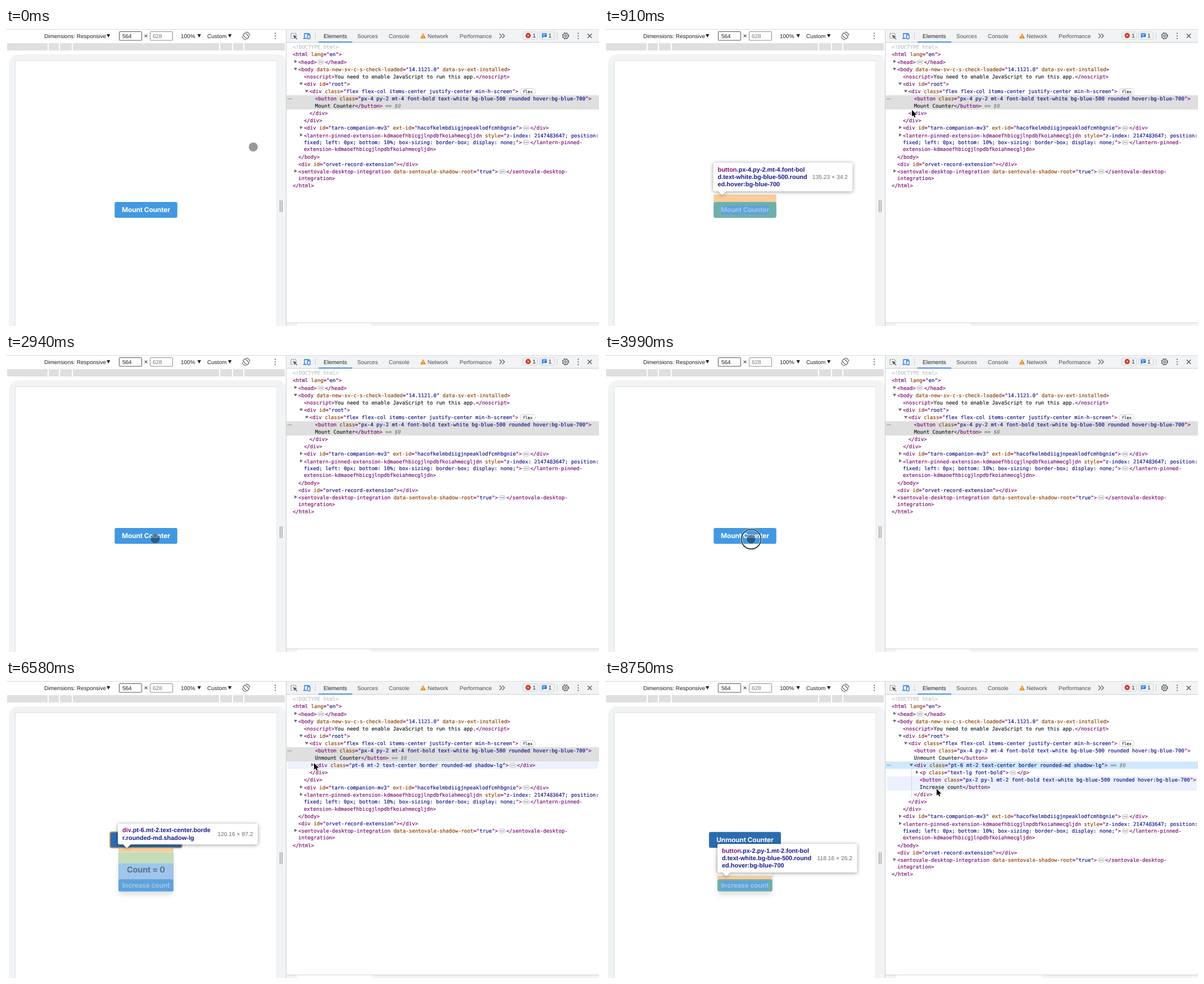
An HTML page with a canvas that plays this animation: 1055x531 px, repeating every 9590 ms.

```html
<!DOCTYPE html>
<html lang="en">
<head>
<meta charset="utf-8">
<title>Mount counter</title>
<style>
html, body { margin: 0; width: 100%; height: 100%; overflow: hidden; background: #fff; }
canvas { display: block; }
</style>
</head>
<body>
<canvas id="stage" width="1055" height="531"></canvas>
<script>
const ctx = document.getElementById('stage').getContext('2d');
const LOOP = 9590, STEP = 70;
const MOUNT = 4200, TREE_MOUNT = 4760, FLASH_END = 6090, EXPAND = 7000;
const SANS = '"Liberation Sans", Arial, sans-serif';
const PAGE = 'Inter, sans-serif';
const MONO = '"DejaVu Sans Mono", monospace';
const CODE = 9.08;
const PURPLE = '#7d1074', BROWN = '#8f4206', NAVY = '#18188c', INK = '#202124', ICON = '#55595e', BLUE = '#1a73e8';
const TINT = {
  content: 'rgba(111,168,220,.66)', padding: 'rgba(147,196,125,.55)', margin: 'rgba(246,178,107,.66)'
};

// Cursor path: time, x, y
const PATH = [
  [0, 440, 212], [70, 464, 199], [210, 512, 172], [560, 525, 165], [770, 533, 158],
  [910, 546, 146], [1190, 568, 138], [1540, 590, 131], [1680, 589, 131], [1890, 581, 130],
  [2030, 581, 130], [2100, 540, 152], [2170, 482, 192], [2240, 430, 222], [2590, 268, 328],
  [2870, 266, 329], [3640, 260, 330], [4200, 260, 330], [4550, 330, 285], [4970, 505, 163],
  [5110, 528, 155], [5700, 588, 152], [6090, 595, 151], [6580, 548, 148], [6860, 546, 150],
  [7490, 546, 150], [7700, 558, 164], [7840, 572, 178], [8260, 589, 192], [8610, 589, 192], [8750, 590, 194]
];
const HOVER = [[0, ''], [210, 'rootEnd'], [770, 'flexEnd'], [910, 'button'], [2100, 'flexEnd'], [2240, ''],
  [5040, 'card'], [7700, 'p'], [7840, 'increase']];
const OVERLAY = [[0, ''], [210, 'page'], [910, 'button'], [2240, ''], [5040, 'card'], [7700, 'p'], [7840, 'increase']];

const latest = (track, t) => track.filter(k => k[0] <= t).pop()[1];

function cursorAt(t) {
  const i = PATH.findIndex(k => k[0] > t);
  if (i < 0) return PATH[PATH.length - 1].slice(1);
  const [t0, x0, y0] = PATH[i - 1], [t1, x1, y1] = PATH[i];
  const p = (t - t0) / (t1 - t0);
  return [x0 + (x1 - x0) * p, y0 + (y1 - y0) * p];
}

// Drawing helpers
function rect(x, y, w, h, fill) {
  ctx.fillStyle = fill;
  ctx.fillRect(x, y, w, h);
}
function paint(fill, stroke, lw = 1) {
  if (fill) { ctx.fillStyle = fill; ctx.fill(); }
  if (stroke) { ctx.strokeStyle = stroke; ctx.lineWidth = lw; ctx.stroke(); }
}
function round(x, y, w, h, r, fill, stroke, lw) {
  ctx.beginPath();
  ctx.roundRect(x, y, w, h, r);
  paint(fill, stroke, lw);
}
function circle(x, y, r, fill, stroke, lw) {
  ctx.beginPath();
  ctx.arc(x, y, r, 0, 7);
  paint(fill, stroke, lw);
}
function poly(pts, fill, stroke, lw, close = !!fill) {
  ctx.beginPath();
  for (let i = 0; i < pts.length; i += 2) ctx.lineTo(pts[i], pts[i + 1]);
  if (close) ctx.closePath();
  paint(fill, stroke, lw);
}
function frame(outer, inner, fill) {
  ctx.beginPath();
  ctx.roundRect(...outer, 3.3);
  ctx.rect(...inner);
  ctx.fillStyle = fill;
  ctx.fill('evenodd');
}
function shadow(color, blur, dy, draw) {
  ctx.save();
  ctx.shadowColor = color;
  ctx.shadowBlur = blur;
  ctx.shadowOffsetY = dy;
  draw();
  ctx.restore();
}
function setFont(size, family, style = '') {
  ctx.font = `${style} ${size}px ${family}`;
}
function text(str, x, y, size, color, family = SANS, style = '', align = 'left', spacing = 0) {
  setFont(size, family, style);
  ctx.letterSpacing = spacing + 'px';
  ctx.textAlign = align;
  ctx.fillStyle = color;
  ctx.fillText(str, x, y + size * 0.36);
  if (family === MONO) {
    // A hairline outline gives the code its slightly heavier weight
    ctx.strokeStyle = color;
    ctx.lineWidth = 0.2;
    ctx.strokeText(str, x, y + size * 0.36);
  }
  const width = ctx.measureText(str).width;
  ctx.letterSpacing = '0px';
  return width;
}
const pageText = (str, y, size, color) => text(str, 249, y, size, color, PAGE, 'bold', 'center', -0.18);
const kebab = x => [9.5, 14, 18.5].forEach(y => circle(x, y, 1.1, ICON));
const caret = x => poly([x, 11, x + 6.4, 11, x + 3.2, 17], INK);

function deviceToolbar() {
  rect(0, 2, 1055, 1, '#d9dbde');
  text('Dimensions: Responsive', 68, 14, 10, INK);
  caret(179);
  rect(201.5, 6.5, 40, 15.5, '#fff');
  round(201.5, 6.5, 40, 15.5, 1, null, '#555');
  text('564', 207, 14, 10, INK);
  text('×', 245.5, 14, 12, INK);
  round(256.5, 6.5, 40, 15.5, 1, null, '#8c8c8c');
  text('628', 261, 14, 10, '#777');
  text('100%', 311, 14, 10, INK);
  caret(340.5);
  text('Custom', 358, 14, 10, INK);
  caret(395);
  ctx.save();
  ctx.translate(427, 14);
  ctx.rotate(-Math.PI / 4);
  round(-2.8, -5.2, 5.6, 10.4, 1, null, ICON, 1.2);
  ctx.restore();
  for (const a of [-1.6, 1.54]) {
    ctx.beginPath();
    ctx.arc(427, 14, 6.8, a, a + 1.5);
    paint(null, ICON, 1.2);
  }
  kebab(479);
  rect(2, 27, 494, 13, '#dfdfdf');
  for (const x of [74, 94, 117, 379, 402, 422]) rect(x, 27, 2, 13, '#fff');
}

function panelToolbar() {
  rect(499, 3, 556, 22, '#f1f3f4');
  rect(499, 25, 556, 1, '#cacdd1');
  ctx.setLineDash([1.5, 1.5]);
  round(507, 9.5, 9, 9, 1, null, ICON, 1.2);
  ctx.setLineDash([]);
  rect(511, 13.5, 7, 7, '#f1f3f4');
  poly([510.5, 12.5, 518, 15, 514.8, 16.2, 513.5, 19.5], ICON);
  poly([514, 16, 518, 20], null, ICON, 1.3);
  poly([531, 17.5, 531, 10, 540.5, 10], null, BLUE, 1.3);
  poly([529, 18.5, 535, 18.5], null, BLUE, 1.6);
  round(536.5, 12, 4.5, 7.3, 0.8, null, BLUE, 1.3);
  rect(550, 8, 1, 12, '#cacdd1');
  text('Elements', 565, 14, 10, INK);
  rect(556, 24.3, 60, 1.5, BLUE);
  text('Sources', 625, 14, 10, '#4a4d51');
  text('Console', 681, 14, 10, '#4a4d51');
  poly([742, 9.3, 747, 18.4, 737, 18.4], '#e88b1a');
  rect(741.5, 12.4, 1, 3, '#fff');
  rect(741.5, 16.2, 1, 1, '#fff');
  text('Network', 750, 14, 10, '#4a4d51');
  text('Performance', 807, 14, 10, '#4a4d51');
  for (const x of [878, 883]) poly([x, 10, x + 4, 14, x, 18], null, ICON, 1.2);
  for (const x of [919.5, 949.5]) round(x, 7, 26, 13, 2, '#f1f3f4', '#d0d3d7');
  circle(929, 13.4, 4.6, '#d32f20');
  poly([927.3, 11.7, 930.7, 15.1], null, '#fff');
  poly([930.7, 11.7, 927.3, 15.1], null, '#fff');
  text('1', 937, 13.8, 10, INK);
  poly([953.5, 9.5, 962, 9.5, 962, 16, 956, 16, 953.5, 18.3], BLUE);
  poly([955, 11.6, 960.5, 11.6], null, '#fff', 0.9);
  poly([955, 13.8, 959, 13.8], null, '#fff', 0.9);
  text('1', 965, 13.8, 10, INK);
  rect(980, 8, 1, 12, '#cacdd1');
  circle(995.5, 14, 4.6, null, ICON, 1.3);
  ctx.setLineDash([2.2, 2.3]);
  circle(995.5, 14, 5.6, null, ICON, 1.3);
  ctx.setLineDash([]);
  circle(995.5, 14, 1.8, null, ICON, 1.2);
  kebab(1018);
  poly([1034.8, 10.3, 1042.2, 17.7], null, ICON, 1.3);
  poly([1042.2, 10.3, 1034.8, 17.7], null, ICON, 1.3);
}

function device(t) {
  round(5, 47, 493, 520, [18, 14, 0, 0], '#f1f3f5');
  rect(15.5, 57.5, 467, 480, '#e3e5e7');
  rect(17, 59, 464.5, 480, '#fff');
  for (const x of [487, 490.5]) rect(x, 307, 1.3, 21, '#8f9296');
  if (t < MOUNT) {
    round(193.3, 310, 111.5, 28.2, 3.3, '#4299e1');
    pageText('Mount Counter', 324, 12, '#fff');
    return;
  }
  round(185, 270.8, 128, 28.2, 3.3, '#2b6cb0');
  if (t < EXPAND) round(185, 270.8, 128, 28.2, 3.3, null, '#c39a66', 2);
  pageText('Unmount Counter', 285, 12, '#fff');
  shadow('rgba(0,0,0,.13)', 10, 6, () => round(201, 309, 96, 68, 5, '#fff'));
  round(199.8, 306, 98.2, 71.2, 4.5, '#fff', '#e6ebf1');
  pageText('Count = 0', 338, 14.5, '#111');
  round(200.2, 355.1, 97.4, 21.6, 3.3, '#4299e1');
  pageText('Increase count', 366, 12, '#fff');
}

function tooltip(x, y, w, h, lines, dims) {
  const ax = x + 16, bottom = y + h;
  shadow('rgba(0,0,0,.4)', 7, 1, () => {
    ctx.beginPath();
    ctx.roundRect(x, y, w, h, 3);
    ctx.moveTo(ax - 7, bottom);
    ctx.lineTo(ax, bottom + 6.5);
    ctx.lineTo(ax + 7, bottom);
    paint('#fff');
  });
  lines.forEach((line, i) => {
    const cy = y + h / 2 + (i - (lines.length - 1) / 2) * 13.2 - 0.4;
    const tag = i ? '' : line.split('.')[0];
    const tagWidth = tag ? text(tag, x + 8, cy, 10.95, PURPLE, SANS, 'bold') : 0;
    text(line.slice(tag.length), x + 8 + tagWidth, cy, 10.95, NAVY, SANS, 'bold');
  });
  text(dims, x + w - 8.5, y + h / 2, 10.3, '#6b6b6b', SANS, '', 'right');
}

const overlays = {
  page() { rect(16, 58, 465.5, 473, TINT.content); },
  button() {
    const content = [206.5, 316.7, 85.1, 15];
    rect(193.3, 296.8, 111.5, 13.2, TINT.margin);
    frame([193.3, 310, 111.5, 28.2], content, TINT.padding);
    rect(...content, TINT.content);
    tooltip(192.5, 240, 248, 51, ['button.px-4.py-2.mt-4.font-bol', 'd.text-white.bg-blue-500.round', 'ed.hover:bg-blue-700'], '135.23 × 34.2');
  },
  card() {
    rect(200, 299, 98, 7, TINT.margin);
    rect(200, 306.5, 98, 19.8, TINT.padding);
    rect(200, 326.3, 98, 50.4, TINT.content);
    tooltip(199, 256, 249, 37, ['div.pt-6.mt-2.text-center.borde', 'r.rounded-md.shadow-lg'], '120.16 × 87.2');
  },
  p() {
    rect(200, 326.3, 98, 22.2, TINT.content);
    tooltip(199.5, 295, 186, 25, ['p.text-lg.font-bold'], '118.16 × 27');
  },
  increase() {
    const content = [206.8, 358.4, 84.2, 15];
    rect(200.2, 348.5, 97.4, 6.6, TINT.margin);
    frame([200.2, 355.1, 97.4, 21.6], content, TINT.padding);
    rect(...content, TINT.content);
    tooltip(200, 292, 248.5, 51, ['button.px-2.py-1.mt-2.font-bol', 'd.text-white.bg-blue-500.round', 'ed.hover:bg-blue-700'], '118.16 × 26.2');
  }
};

// Tree rows: level, lines, arrow ('>' closed, 'v' open), key
function treeRows(t) {
  const mounted = t >= TREE_MOUNT, open = t >= EXPAND;
  const styles = 'font-bold text-white bg-blue-500 rounded hover:bg-blue-700">';
  const cardTag = '<div class="pt-6 mt-2 text-center border rounded-md shadow-lg">';
  const card = !mounted ? [] : !open ? [[4, [cardTag + '…</div>'], '>', 'card']] : [
    [4, [cardTag], 'v', 'card'],
    [5, ['<p class="text-lg font-bold">…</p>'], '>', 'p'],
    [5, ['<button class="px-2 py-1 mt-2 ' + styles, 'Increase count</button>'], '', 'increase'],
    [4, ['</div>'], '', 'cardEnd']
  ];
  return [
    [0, ['<!DOCTYPE html>'], '', 'doctype'],
    [0, ['<html lang="en">']],
    [1, ['<head>…</head>'], '>'],
    [1, ['<body data-new-sv-c-s-check-loaded="14.1121.0" data-sv-ext-installed>'], 'v'],
    [2, ['<noscript>You need to enable JavaScript to run this app.</noscript>']],
    [2, ['<div id="root">'], 'v'],
    [3, ['<div class="flex flex-col items-center justify-center min-h-screen">'], 'v', 'flex'],
    [4, ['<button class="px-4 py-2 mt-4 ' + styles, (mounted ? 'Unmount' : 'Mount') + ' Counter</button>'], '', 'button'],
    ...card,
    [3, ['</div>'], '', 'flexEnd'],
    [2, ['</div>'], '', 'rootEnd'],
    [2, ['<div id="tarn-companion-mv3" ext-id="hacofkelmbdiigjnpeaklodfcmhbgnie">…</div>'], '>'],
    [2, ['<lantern-pinned-extension-kdmaoefhbicgjlnpdbfkoiahmecgljdn style="z-index: 2147483647; position:',
      'fixed; left: 0px; bottom: 10%; box-sizing: border-box; display: none;">…</lantern-pinned-',
      'extension-kdmaoefhbicgjlnpdbfkoiahmecgljdn>'], '>'],
    [1, ['</body>']],
    [1, ['<div id="orvet-record-extension"></div>']],
    [1, ['<sentovale-desktop-integration data-sentovale-shadow-root="true">…</sentovale-desktop-', 'integration>'], '>'],
    [0, ['</html>']]
  ];
}

function ellipsisPill(x, y) {
  round(x + 2, y - 3.5, 11, 7.5, 3.7, '#f1f3f4', '#b4b7bb', 0.8);
  for (const d of [5, 7.5, 10]) circle(x + d, y + 0.3, 0.8, '#5f6368');
}

// Draws one line of markup; returns the syntax mode for the next line and the end position
function markup(line, x, y, mode) {
  const colors = { text: INK, tag: PURPLE, attr: BROWN, value: NAVY };
  let run = '', color = '';
  const flush = () => {
    if (run) x += text(run, x, y, CODE, color, MONO);
    run = '';
  };
  for (const ch of line) {
    if (ch === '…') {
      flush();
      ellipsisPill(x, y);
      x += 14.9;
      continue;
    }
    if (mode === 'text' && ch === '<') mode = 'tag';
    const mark = mode !== 'text' && (ch === '"' || (mode !== 'value' && '<>='.includes(ch)));
    const next = mark ? PURPLE : colors[mode];
    if (next !== color) flush();
    color = next;
    run += ch;
    if (ch === '"' && mode !== 'text') mode = mode === 'value' ? 'attr' : 'value';
    else if (ch === '>' && mode !== 'value') mode = 'text';
    else if (ch === ' ' && mode === 'tag') mode = 'attr';
  }
  flush();
  return { mode, x };
}

function tree(t) {
  const hover = latest(HOVER, t), selected = t < EXPAND ? 'button' : 'card';
  const flash = t >= TREE_MOUNT && t < FLASH_END ? 0.75 * (FLASH_END - t) / (FLASH_END - TREE_MOUNT) : 0;
  setFont(CODE, MONO);
  const cw = ctx.measureText('M').width;
  let y = 34;
  for (const [level, lines, arrow, key] of treeRows(t)) {
    const x = 510 + level * 9.95, h = 13.17 + (lines.length - 1) * 12.4, top = y - 6.5;
    if (key && key === selected) {
      rect(499, top, 556, h, t < EXPAND ? '#dfdfdf' : '#cfe8fc');
      for (const d of [502, 504.7, 507.4]) circle(d, y, 0.8, '#5f6368');
    } else if (key && key === hover) {
      round(502, top, 551, h, 2, '#ebf1fd');
    }
    if (flash && (key === 'button' || key === 'card')) {
      const tint = `rgba(110,55,115,${flash})`;
      round(x + cw, y - 5, cw * (key === 'button' ? 6 : 3), 10.5, 1.5, tint);
      if (key === 'button') round(x, y + 7.4, cw * 15, 10.5, 1.5, tint);
    }
    if (arrow === '>') poly([x - 6.8, y - 3.8, x - 2, y - 0.8, x - 6.8, y + 2.2], '#6e6e6e');
    if (arrow === 'v') poly([x - 8, y - 2.6, x - 1.8, y - 2.6, x - 4.9, y + 2.2], '#6e6e6e');
    if (key === 'doctype') {
      text(lines[0], x, y, CODE, '#c0c0c0', MONO);
    } else {
      let end = { mode: 'text', x };
      lines.forEach((line, i) => { end = markup(line, x, y + i * 12.4, end.mode); });
      const lastY = y + h - 13.17;
      if (key === selected) text('== $0', end.x + 5, lastY, CODE, '#7b8085', MONO, 'italic');
      if (key === 'flex') {
        round(914.5, y - 5, 27, 10.4, 5, '#fff', '#c4c7cb');
        text('flex', 928, y + 0.2, 7.3, INK, MONO, '', 'center');
      }
    }
    if (key === 'cardEnd') rect(545, 158.5, 1, y + 6 - 158.5, '#c5dcf3');
    y += h;
  }
  rect(499, 525, 556, 1, '#cfd2d6');
  rect(499, 526, 556, 5, '#f1f3f4');
  rect(518, 526, t < EXPAND ? 132 : 260, 5, '#fff');
}

function cursor(t) {
  const [x, y] = cursorAt(t);
  ctx.save();
  ctx.translate(x, y);
  ctx.lineJoin = 'round';
  if (x < 481.5) {
    circle(0, 0, 8, 'rgba(0,0,0,.4)');
    if (t >= 3990 && t < MOUNT) {
      circle(0, 0, 17.5, null, 'rgba(255,255,255,.8)', 3.4);
      circle(0, 0, 17.5, null, '#10151f', 1.5);
      circle(0, 0, 8.4, null, 'rgba(255,255,255,.35)', 1);
    }
  } else if (x >= 499 && x < 509) {
    const shape = [-6, 0, -2.5, -3.6, -2.5, -1, 2.5, -1, 2.5, -3.6, 6, 0, 2.5, 3.6, 2.5, 1, -2.5, 1, -2.5, 3.6];
    poly(shape, '#fff', '#fff', 2);
    poly(shape, '#000');
  } else {
    const shape = [0, 0, 0, 11.8, 2.7, 9.4, 4.5, 13.4, 6.4, 12.5, 4.7, 8.7, 8.4, 8.6];
    poly(shape, '#fff', '#fff', 1.8);
    poly(shape, '#000');
  }
  ctx.restore();
}

function draw(t) {
  rect(0, 0, 1055, 531, '#fff');
  deviceToolbar();
  device(t);
  const overlay = latest(OVERLAY, t);
  if (overlay) overlays[overlay]();
  rect(498, 3, 1, 528, '#cacdd1');
  panelToolbar();
  tree(t);
  cursor(t);
}

ctx.textRendering = 'geometricPrecision';
let start;
function tick(now) {
  start ??= now;
  draw(Math.floor(((now - start) % LOOP) / STEP) * STEP);
  requestAnimationFrame(tick);
}
requestAnimationFrame(tick);
</script>
</body>
</html>
```
